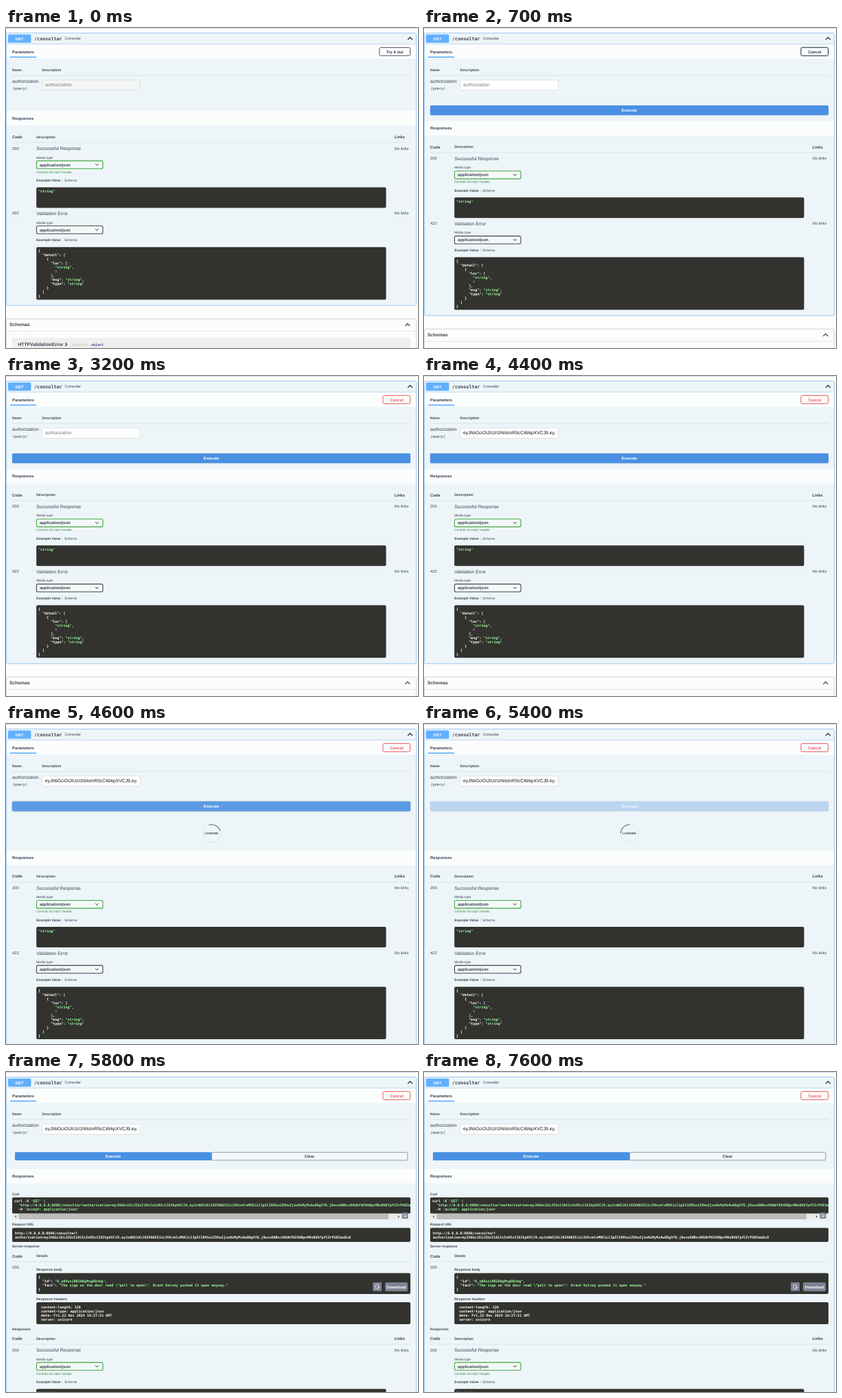
An HTML page that plays this animation: 600 px wide and 467 px high, repeating every 8 s.

```html
<!DOCTYPE html>
<html lang="en">
<head>
<meta charset="utf-8">
<title>API docs</title>
<style>
html, body { margin: 0; width: 100%; height: 100%; overflow: hidden; background: #fdfdfc; }
svg { display: block; width: 100vw; height: 100vh; }
text { white-space: pre; font-family: "Liberation Sans", Arial, sans-serif; text-rendering: geometricPrecision; fill: #3b4151; }
.b { font-weight: 700; }
.i { font-style: italic; }
.m { font-family: "DejaVu Sans Mono", monospace; }
.c { text-anchor: middle; }
</style>
</head>
<body>
<svg id="stage" viewBox="0 0 600 467" preserveAspectRatio="none"></svg>
<script>
const LOOP = 8000;
const HOVER = 300, TRY = 700, PASTE = 3700, HOVER_RUN = 4300, RUN = 4525, DONE = 5500;
const INK = '#3b4151', GREEN = '#a2fca2', DARK = '#32322f', BLUE = '#4990e2';
const S = 5.06, M = 5.9, L = 6.76, MONO = 5.055, LINE = 6;

const URL_BASE = 'http://0.0.0.0:8000/consultar?';
const TOKEN = 'eyJhbGciOiJIUzI1NiIsInR5cCI6IkpXVCJ9' +
  '.eyJzdWIiOiJ0ZXN0ZS11c3VhcmlvMDEiLCJpZCI6MiwiZXhwIjoxNzMyMzAwODg5fQ' +
  '.j9wvu6NBscRAUbfNZ4XBpvM0sBVbTpfCZrPU83aoEu8';

const esc = s => s.replace(/&/g, '&amp;').replace(/</g, '&lt;');
const text = (x, y, s, size = M, cls = '', fill = INK) =>
  `<text x="${x}" y="${y}" font-size="${size}" class="${cls}" style="fill:${fill}">${esc(s)}</text>`;
const bold = (x, y, s, size = M, fill) => text(x, y, s, size, 'b', fill);
const rect = (x, y, x2, y2, fill, rx = 0, more = '') =>
  `<rect x="${x}" y="${y}" width="${x2 - x}" height="${y2 - y}" rx="${rx}" fill="${fill}" ${more}/>`;
const stroke = (color, w = 1) => `stroke="${color}" stroke-width="${w}"`;
const path = (d, color, w = 1) => `<path d="${d}" fill="none" ${stroke(color, w)}/>`;
const rule = (y, x = 9, x2 = 589, color = '#cdd6db') => path(`M${x} ${y}H${x2}`, color, 0.6);
const group = (id, body) => `<g id="${id}">${body}</g>`;

// Monospaced lines with strings in green and bare numbers in purple
function code(x, y, lines) {
  const paint = s => esc(s)
    .replace(/"(?:\\.|[^"\\])*"|'[^']*'|^ +\d+$/g, m =>
      `<tspan fill="${/\d$/.test(m) ? '#9a6590' : GREEN}">${m}</tspan>`)
    .replace(/<tspan fill="[^"]*">("[^"]*")<\/tspan>(?=:)/g, '$1');
  return lines.map((s, i) =>
    `<text x="${x}" y="${y + i * LINE}" font-size="${MONO}" class="b m" style="fill:inherit">${paint(s)}</text>`).join('');
}
const codeBox = (x, y, x2, y2, body) => rect(x, y, x2, y2, DARK, 2) + `<g fill="#fff">${body}</g>`;

function response(y, status, title, edge, lines, height, note = '') {
  const box = y + 55;
  return text(9, y, status) + text(44.2, y + 0.6, title, L) +
    text(565.5, y, 'No links', M, 'i') + text(44.2, y + 13.2, 'Media type', 4.9) +
    rect(44.5, y + 16.4, 141, y + 27.8, '#f4f8f6', 2, stroke(edge, 1.1)) +
    bold(49, y + 24.1, 'application/json') +
    path(`M130.2 ${y + 20.9}l2.2 2.2 2.2-2.2`, '#222', 1) + note +
    codeBox(44.2, box, 553.5, box + height, code(47, y + 62.5, lines));
}
const example = y => bold(44.2, y, 'Example Value', S) + path(`M82.4 ${y - 4}v5`, '#aab0b5', 0.4) + text(85, y, 'Schema', 5);

const headers = y => bold(9, y, 'Code') + bold(44.2, y - 0.3, 'Description', S) +
  bold(565.5, y, 'Links') + rule(y + 6.2);

const note = `<text x="44.2" y="211.5" font-size="4.7" style="fill:#35883a">Controls <tspan class="m">Accept</tspan> header.</text>`;
const table = headers(160.9) +
  response(177.5, '200', 'Successful Response', '#41a544', ['"string"'], 30, note) + example(224.2) +
  response(272.4, '422', 'Validation Error', '#41444e', [], 0) + example(311.1) +
  codeBox(44.2, 319.8, 553.5, 396.5, code(47, 327, [
    '{', '  "detail": [', '    {', '      "loc": [', '        "string",', '        0', '      ],',
    '      "msg": "string",', '      "type": "string"', '    }', '  ]', '}']));

const copyIcon = (x, y, s) => rect(x, y, x + s, y + s, '#7d8293', 1) +
  rect(x + s * 0.3, y + s * 0.28, x + s * 0.66, y + s * 0.74, 'none', 0.4, stroke('#fff', 0.7)) +
  path(`M${x + s * 0.5} ${y + s * 0.56}h${s * 0.26}`, '#fff', 0.8);

const result =
  bold(9, 179.8, 'Curl', S) +
  codeBox(9, 183, 589, 207, `<g clip-path="url(#curlClip)">` + code(12, 190.4, [
    "curl -X 'GET' \\", `  '${URL_BASE}authorization=${TOKEN}' \\`, "  -H 'accept: application/json'"]) + '</g>') +
  rect(9, 206.5, 589, 215.2, '#e9ebeb') + rect(18.5, 207, 557, 215, '#bcbcba') +
  `<path d="M15 209.2v3.6l-2.4-1.8zM571 209.2v3.6l2.4-1.8z" fill="#666"/>` +
  copyIcon(576.5, 205.3, 8.8) +
  bold(9, 224.4, 'Request URL', S) +
  codeBox(9, 227.6, 589, 248, code(13, 236.9, [URL_BASE, 'authorization=' + TOKEN])) +
  bold(9, 256, 'Server response', S) +
  bold(9, 270.6, 'Code') + bold(44.2, 270.3, 'Details', S) + rule(276.8) +
  text(9, 287.3, '200') + bold(44.2, 290, 'Response body', S) +
  codeBox(44.2, 293.6, 589, 324, code(47, 301, [
    '{', '  "id": "6_o0VusiRR26KgMsg8Dcbg",',
    '  "fact": "The sign on the door read \\"pull to open\\". Brant Kolvey pushed it open anyway."', '}'])) +
  copyIcon(534.2, 307, 12.8) + rect(552, 307, 585, 320, '#7d8293', 2) +
  text(568.5, 315.6, 'Download', M, 'b c', '#fff') +
  bold(44.2, 332.7, 'Response headers', S) +
  codeBox(44.2, 336, 589, 368, code(48, 345.2, [
    ' content-length: 120 ', ' content-type: application/json ',
    ' date: Fri,22 Nov 2024 18:27:51 GMT ', ' server: uvicorn ']))  +
  bold(9, 377.2, 'Responses', S);

const schemas = rect(0.5, 424.5, 597.5, 520, '#fcfcfb', 2, stroke('#c6c8ca', 0.8)) +
  bold(5, 435.3, 'Schemas', L) + path('M581.4 434.8l3.4-3.4 3.4 3.4', '#222', 1.1) +
  rule(442.6, 0.5, 597.5, '#d4d6d8') + rect(9, 452.2, 589, 490, '#efefee', 2) +
  bold(17.4, 463.9, 'HTTPValidationError', L) + path('M86.6 459.4l2.2 2.3-2.2 2.3', '#222', 1.1) +
  text(96, 463.6, 'Expand all', 5.1, '', '#b9bbbd') + text(124, 463.6, 'object', 5, 'b m', '#3b4a8f');

const stage = document.getElementById('stage');
stage.innerHTML =
  `<clipPath id="inputClip"><rect x="56" y="76" width="135" height="15"/></clipPath>
   <clipPath id="curlClip"><rect x="9" y="183" width="580" height="24"/></clipPath>` +
  rect(0, 0, 600, 467, '#fdfdfc') + rect(0, 0, 598, 1, '#d6dcdd') +
  group('schemas', schemas) +
  rect(0.6, 7.3, 597.5, 405, '#edf5f9', 2, 'id="block" ' + stroke('#8fc4f4', 0.9)) +
  rect(1, 23.6, 597, 45, '#fbfdfd') + rule(23.4, 1, 597, '#9fcaf0') +
  rect(3, 9.4, 36.5, 21.5, '#61affe', 1.6) + text(19.6, 17.7, 'GET', M, 'b c', '#fff') +
  text(41, 17.6, '/consultar', L, 'b m') + text(85.4, 17.4, 'Consultar', 5.55) +
  path('M585 17l3.5-3.5 3.5 3.5', '#222', 1.1) +
  bold(9, 36.6, 'Parameters') + rect(6, 41.6, 44.2, 43.4, '#61affe') +
  group('tryBtn', rect(543.8, 28.6, 588.5, 40.3, '#fbfdfd', 1.8, stroke('#55585f', 1)) +
    text(566.2, 36.5, 'Try it out', M, 'b c')) +
  group('cancelBtn', rect(549, 28.6, 588.5, 40.3, '#fbfdfd', 1.8, 'id="cancelBox" stroke-width="1"') +
    text(568.9, 36.5, 'Cancel', M, 'b c', 'inherit')) +
  bold(9, 62.8, 'Name', S) + bold(52.6, 62.8, 'Description', S) + rule(69.2) +
  text(9, 79.6, 'authorization', L) + text(9.4, 90.4, '(query)', 5.2, 'b i m', '#666b73') +
  rect(52.8, 76, 195.3, 90.8, '#fff', 1.6, 'id="field" ' + stroke('#d5d9da', 0.7)) +
  text(57, 85.3, 'authorization', L, '', '#777').replace('<text', '<text id="hint"') +
  `<g id="value" clip-path="url(#inputClip)">${text(57, 85.4, TOKEN.slice(0, 44), L, '', '#111')}</g>` +
  group('wideRun', rect(9, 113, 589, 127.3, BLUE, 1.8) + text(299, 122.2, 'Execute', M, 'b c', '#fff')) +
  group('splitRun', rect(299.5, 117.3, 584.8, 128.8, '#f2f8fb', 1.6, stroke('#7f858c', 0.8)) +
    text(442, 125.1, 'Clear', M, 'b c') +
    group('splitExec', rect(13, 117, 299.5, 129.1, BLUE, 1.4) + text(156, 125.1, 'Execute', M, 'b c', '#fff'))) +
  group('spinner', `<circle cx="299.5" cy="159.8" r="13" fill="none" ${stroke('#dce3e7', 0.9)}/>` +
    `<g id="arc">${path('M290.31 150.61A13 13 0 0 1 308.69 150.61', '#5c6064', 1)}</g>` +
    text(299.2, 161.3, 'LOADING', 4.3, 'b c')) +
  group('respHead', rect(1, 121, 597, 142, '#fbfdfd') + bold(9, 133.7, 'Responses')) +
  group('table', table) + group('result', result);

const $ = id => document.getElementById(id);
const show = (id, on) => $(id).setAttribute('display', on ? 'inline' : 'none');
const move = (id, dy) => $(id).setAttribute('transform', `translate(0 ${dy})`);
const fade = (t, start) => {
  const p = Math.min(1, Math.max(0, (t - start) / 300));
  return p * p * (3 - 2 * p);
};
const mix = (a, b, p) => `rgb(${a.map((v, i) => Math.round(v + (b[i] - v) * p))})`;
const glow = (id, a) => $(id).style.filter = `drop-shadow(0 0 1px rgba(0,0,0,${0.1 + a * 0.3}))`;

// Offsets for the four layouts: idle, editing, loading, answered
const BODY_DY = [0, 14.8, 63.6, 230], HEAD_DY = [0, 14.8, 63.6, 20.5];

function draw(t) {
  const step = t < TRY ? 0 : t < RUN ? 1 : t < DONE ? 2 : 3;
  const dy = BODY_DY[step];
  move('table', dy);
  move('schemas', dy);
  move('respHead', HEAD_DY[step]);
  $('block').setAttribute('height', 397.7 + dy);

  show('tryBtn', step === 0);
  show('cancelBtn', step > 0);
  const red = mix([59, 65, 81], [240, 94, 98], fade(t, TRY));
  $('cancelBox').setAttribute('stroke', red);
  $('cancelBtn').style.fill = red;
  const hover = fade(t, HOVER) - fade(t, 1200);
  glow('tryBtn', hover);
  glow('cancelBtn', hover);

  $('field').setAttribute('fill', step ? '#fff' : '#f4f6f5');
  show('hint', t < PASTE);
  show('value', t >= PASTE);

  show('wideRun', step === 1 || step === 2);
  $('wideRun').setAttribute('opacity', 1 - 0.7 * fade(t, RUN));
  glow('wideRun', fade(t, HOVER_RUN));
  show('splitRun', step === 3);
  $('splitExec').setAttribute('opacity', 0.3 + 0.7 * fade(t, DONE));

  show('spinner', step === 2);
  $('arc').setAttribute('transform', `rotate(${(t - RUN) * 0.36} 299.5 159.8)`);
  show('result', step === 3);
}

const begin = performance.now();
function tick() {
  draw((performance.now() - begin) % LOOP);
  requestAnimationFrame(tick);
}
tick();
</script>
</body>
</html>
```
